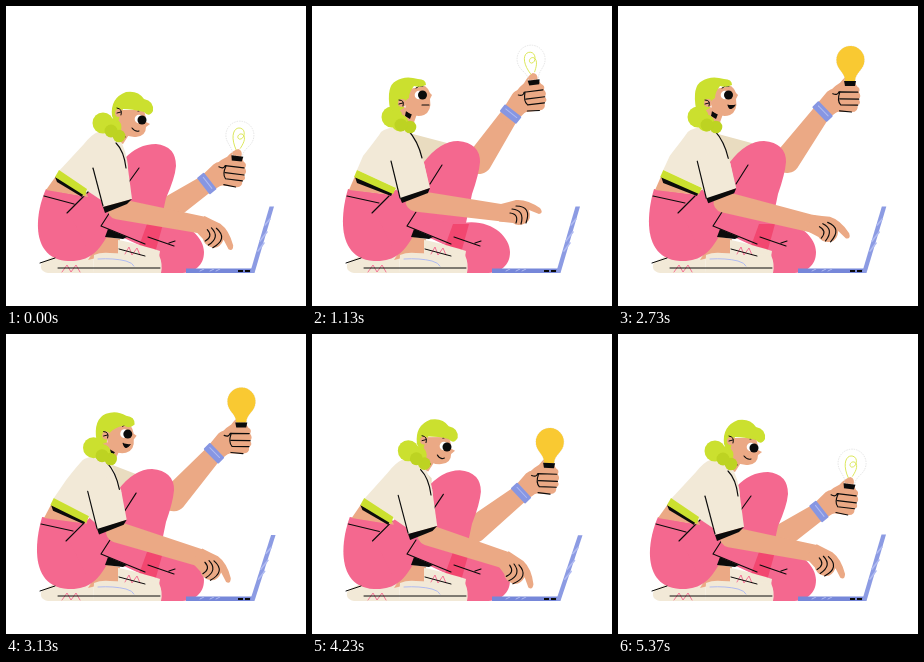
Write an HTML page that moves like this. It is 300x300 px and loops after 5410 ms.

```html
<!DOCTYPE html>
<html lang="en">
<head>
<meta charset="utf-8">
<title>Idea and laptop</title>
<style>
  html, body { margin: 0; width: 100%; height: 100%; overflow: hidden; background: #fff; }
  svg { display: block; width: 100vw; height: 100vh; }
</style>
</head>
<body>
<svg id="stage" viewBox="0 0 300 300"></svg>
<script>
const LOOP = 5410;
const SKIN = '#eba985', SHIRT = '#f2e9d7', FAR_SHIRT = '#e9dcc0', PINK = '#f4688f', RED = '#f24770',
      HAIR = '#cbe02f', HAIR_DARK = '#bdd322', BLUE = '#7687d9', LID = '#8c9be3', PALE = '#b0bbf1',
      INK = '#0b0b0b', BULB = '#f9c932';

const TIMES = [0, 570, 1130, 1600, 2100, 2730, 3570, 4230, LOOP];
const TRACKS = {
  body:   [0, .25, 1, 1, 1, .97, .25, .1],
  head:   [0, .18, 1, 1.12, 1.14, 1, .1, .04],
  knee:   [0, .3, 1, 1, 1, 1, .9, .55],
  smile:  [.35, .3, 0, .2, 1, 1, 1, .5],
  baseX:  [231, 229, 222, 222, 223, 232, 237, 237],
  baseY:  [153, 124, 77, 71, 72, 78, 111, 132],
  tilt:   [7, 2, -7, -8, -8, 1, 0, 2],
  elbowX: [157, 164, 167, 167, 167, 169, 165, 162],
  elbowY: [207, 183, 155, 153, 153, 154, 181, 196],
  armX:   [112, 109, 104, 104, 104, 106, 115, 116],
  armY:   [203, 200, 195, 195, 195, 196, 200, 201],
  wristX: [196, 194, 191, 191, 191, 195, 192, 193],
  wristY: [219, 213, 207, 207, 207, 218, 227, 226],
  point:  [41, 17, 0, -1, -1, 22, 54, 48],
  lid:    [0, 0, 0, 0, 0, .3, 2.4, 2.2]
};

// Periodic monotone cubic through the pose values.
function sample(values, t) {
  const n = values.length;
  let i = 0;
  while (i < n - 1 && t >= TIMES[i + 1]) i++;
  const slope = j => {
    const a = (j + n) % n;
    return (values[(a + 1) % n] - values[a]) / (TIMES[a + 1] - TIMES[a]);
  };
  const tangent = j => {
    const a = slope(j - 1), b = slope(j);
    return a * b <= 0 ? 0 : 2 * a * b / (a + b);
  };
  const span = TIMES[i + 1] - TIMES[i], u = (t - TIMES[i]) / span;
  const from = values[i], to = values[(i + 1) % n];
  return from + (to - from) * u * u * (3 - 2 * u)
    + span * u * (1 - u) * ((1 - u) * tangent(i) - u * tangent(i + 1));
}

const NUM = /-?\d+(\.\d+)?/g;
function mix(a, b, k) {
  const ends = b.match(NUM);
  let i = 0;
  return a.replace(NUM, v => (+v + (ends[i++] - v) * k).toFixed(2));
}

const fill = (d, color) => `<path d="${d}" fill="${color}"/>`;
const line = (d, color = INK, w = 1.15) =>
  `<path d="${d}" fill="none" stroke="${color}" stroke-width="${w}" stroke-linecap="round" stroke-linejoin="round"/>`;
const dot = (pos, r, color) => {
  const [x, y] = pos.split(' ');
  return `<circle cx="${x}" cy="${y}" r="${r}" fill="${color}"/>`;
};
const group = (x, y, angle, content) =>
  `<g transform="translate(${x} ${y}) rotate(${angle})">${content}</g>`;

function limb(x1, y1, r1, x2, y2, r2) {
  const len = Math.hypot(x2 - x1, y2 - y1), nx = (y1 - y2) / len, ny = (x2 - x1) / len;
  return fill(`M${x1 + nx * r1} ${y1 + ny * r1}A${r1} ${r1} 0 0 1 ${x1 - nx * r1} ${y1 - ny * r1}
    L${x2 - nx * r2} ${y2 - ny * r2}A${r2} ${r2} 0 0 1 ${x2 + nx * r2} ${y2 + ny * r2}Z`, SKIN);
}

function bulbHand(lit) {
  const glass = 'M-5 -3C-5 -12 -14 -14 -14 -24A14 14 0 0 1 14 -24C14 -14 5 -12 5 -3Z';
  return limb(-28, 29, 9, -15, 16, 11)
    + fill('M-27 18Q-20 5 -10 -1Q-4 -9 0 -10Q5 -9 4 -3L7 2Q11 4 9 8Q12 12 9 15Q12 19 8 21Q9 28 2 28L-11 28Q-17 29 -20 33Z', SKIN)
    + `<path d="${glass}" fill="none" stroke="#ddd" stroke-width=".7" stroke-dasharray="1.5 1"/>`
    + line('M-2 -9C-10 -22 -7 -32 0 -31C6 -30 5 -20 0 -20C-4 -21 -1 -27 3 -25C7 -22 4 -15 2 -11', '#d6e33f', .8)
    + `<path d="${glass}" fill="${BULB}" opacity="${lit}"/>`
    + fill('M-6 -3H6L5 2H-5Z', INK)
    + line('M-17 10Q-12 12 -11 8L8 8M-10 15L9 15M-9 21L8 21M-10 27L2 28M-10 8Q-13 17 -9 21')
    + group(-27, 28, 45, `<rect x="-10.5" y="-4.5" width="21" height="9" rx="1" fill="#8796e2"/>`
      + line('M-7 -1L7 -1', PALE, 1));
}

function legs(k) {
  return fill('M36 256L52 248Q72 250 88 248L87 267L42 267Q32 265 36 256Z', SHIRT)
    + fill('M97 230L114 233L112 248L90 252L82 254Z', SKIN)
    + fill(mix('M40 183C28 210 25 253 62 255C82 256 92 246 100 232L112 205L82 191Z',
               'M36 183C28 210 25 253 62 255C82 256 92 246 100 232L112 205L80 189Z', k), PINK)
    + fill(mix('M62 205L118 153Q132 138 150 138Q170 140 170 160Q169 172 160 192L148 246L118 232L95 220L80 240Z',
               'M62 205L112 156Q128 135 146 135Q168 137 168 156Q167 168 160 188L148 246L118 232L95 220L80 240Z', k), PINK)
    + fill('M100 212L150 217C178 212 198 230 198 246C198 260 188 267 174 267L153 267Q157 252 148 245L134 237Z', PINK)
    + fill('M141 218L157 218L149 247L133 240Z', RED)
    + fill('M102 223L121 231L117 233L99 231Z', INK)
    + line('M104 206L95 220L139 238M142 231L168 240M163 237L169 235')
    + line(mix('M61 207L84 184M120 180L133 162M38 190L68 198', 'M60 207L77 190M118 178L130 159M35 190L67 197', k));
}

function shoes() {
  return fill('M112 234Q125 236 154 245L153 251L112 249Z', SHIRT)
    + fill('M88 249Q95 246 104 247L153 249Q157 258 155 267L87 267Z', SHIRT)
    + line('M119 248L123 241L126 249L131 242L134 249M56 266L61 259L65 266L70 259L74 266', PINK, .9)
    + line('M34 257L49 252M113 243L139 250M52 262H154', INK, 1)
    + line('M92 253Q108 252 120 255Q127 257 128 260', PALE, 1);
}

function torso(k) {
  return fill(mix('M50 170L80 186L82 191L40 184Z', 'M43 170L82 186L80 189L37 184Z', k), SKIN)
    + fill(mix('M49 171L78 186L76 191L51 176Z', 'M43 171L81 186L79 190L45 177Z', k), INK)
    + fill(mix('M92 126Q104 121 112 130Q121 145 122 162L116 188L98 196L80 184L53 165L78 138Q86 128 92 126Z',
               'M72 124Q85 118 97 123Q106 135 112 157L116 176L90 190L82 181L45 164Q51 150 66 131Q69 126 72 124Z', k), SHIRT)
    + fill(mix('M53 164L81 183L79 190L49 171Z', 'M45 164L84 182L81 188L42 171Z', k), HAIR);
}

function sleeve(k) {
  return fill(mix('M87 162L112 140L121 155L126 193L97 201Z', 'M79 155L100 140L112 157L118 182L88 193Z', k), SHIRT)
    + fill(mix('M97 201L126 193L121 198L99 207Z', 'M88 192L118 182L116 187L90 197Z', k), INK)
    + line(mix('M87 162L97 200', 'M79 155L88 192', k))
    + line(mix('M110 137Q118 145 120 162', 'M96 124Q106 135 110 152', k));
}

function neck(k) {
  return fill(mix('M106 114L126 124L117 138L102 132Z', 'M88 100L106 105L99 125L80 124Z', k), SKIN)
    + fill(mix('M116 128L120 131L118 132L116 130Z', 'M94 105L100 108L98 113L93 110Z', k), INK);
}

function head(k, smile) {
  const at = (a, b) => mix(a, b, k);
  const [x1, y1, x2, y2] = at('126 122 133 125', '110 99 117 99').split(' ').map(Number);
  const sag = smile * 7;
  return fill(at('M109 104L138 104Q140 110 140 116L144 118L140 121Q140 130 130 131Q118 132 112 120Z',
                 'M92 84L113 80Q117 83 118 87L120 89L118 93Q120 105 112 109Q103 112 94 105Z'), SKIN)
    + dot(at('133 113', '107 89'), 4.3, '#fff')
    + dot(at('136 114', '110.5 89'), 4.5, INK)
    + line(at('M132 105Q136 103 139 105', 'M104 82Q107 79 111 80'), INK, 1)
    + `<path d="M${x1} ${y1}Q${(x1 + x2) / 2 - sag * .2} ${(y1 + y2) / 2 + sag} ${x2} ${y2}"
        fill="${smile > .6 ? INK : 'none'}" stroke="${INK}" stroke-width="1.1" stroke-linecap="round"/>`
    + dot(at('97 117', '80 111'), 10.5, HAIR)
    + dot(at('107 121', '88 117'), 8.5, HAIR)
    + dot(at('113 130', '98 121'), 6.3, HAIR_DARK)
    + dot(at('105 125', '89 119'), 6.5, HAIR_DARK)
    + fill(at('M106 110Q104 92 120 86Q132 84 138 93Q148 95 147 105Q143 112 138 106Q126 103 117 103Q114 108 112 116Q108 116 106 110Z',
              'M78 103Q74 80 84 75Q93 69 106 73Q114 73 114 79Q108 82 102 80Q97 86 97 92Q90 96 92 102Q84 108 78 103Z'), HAIR)
    + dot(at('113 107', '90 97'), 4, SKIN)
    + line(at('M111 102Q117 103 115 109M111 107L115 106', 'M87 94Q93 94 91 100M87 98L91 97'), INK, 1);
}

function pointingHand() {
  return fill('M-4 -8.5Q6 -11 13 -13Q24 -14 37 -5Q41 0 36 1L26 -3Q29 6 23 10Q15 14 10 10L-4 8.5Z', SKIN)
    + line('M13 -7Q29 -7 23 10M9 -4Q22 -3 18 11M7 0Q16 1 13 10');
}

function laptop(lid) {
  return fill('M180 262.5H248V267H180Z', BLUE)
    + line('M194 265L198 263M204 265L208 263M210 265L214 263', PALE, 1)
    + group(247, 266, lid, fill('M16.5 -65.5H21L1.5 1H-3Z', LID)
      + line('M5 -21L11 -29M7 -31L14 -40M12 -47L17 -53', PALE, 1.6))
    + fill('M232 264H237V266H232ZM239 264H244V266H239Z', INK);
}

const ramp = (t, start, len) => Math.min(1, Math.max(0, (t - start) / len));
const stage = document.getElementById('stage');

function draw(now) {
  const t = now % LOOP, p = {};
  for (const name in TRACKS) p[name] = sample(TRACKS[name], t);
  const lit = ramp(t, 1500, 100) - ramp(t, 4850, 100);

  // Wrist of the raised hand, carried along with the bulb's tilt.
  const a = p.tilt * Math.PI / 180, c = Math.cos(a), s = Math.sin(a);
  const wx = p.baseX - 27 * c - 28 * s, wy = p.baseY - 27 * s + 28 * c;

  stage.innerHTML =
    limb(p.elbowX, p.elbowY, 13, wx, wy, 9)
    + group(p.baseX, p.baseY, p.tilt, bulbHand(lit))
    + fill(mix('M108 132L118 145L119 166L105 168Z', 'M97 127L135 137L120 166L104 166Z', p.body), FAR_SHIRT)
    + legs(p.knee) + shoes() + neck(p.head) + torso(p.body)
    + laptop(p.lid)
    + limb(p.armX, p.armY, 10.5, p.wristX, p.wristY, 8.7)
    + group(p.wristX, p.wristY, p.point, pointingHand())
    + sleeve(p.body) + head(p.head, p.smile);
}

const begin = performance.now();
function tick() {
  draw(performance.now() - begin);
  requestAnimationFrame(tick);
}
tick();
</script>
</body>
</html>
```
